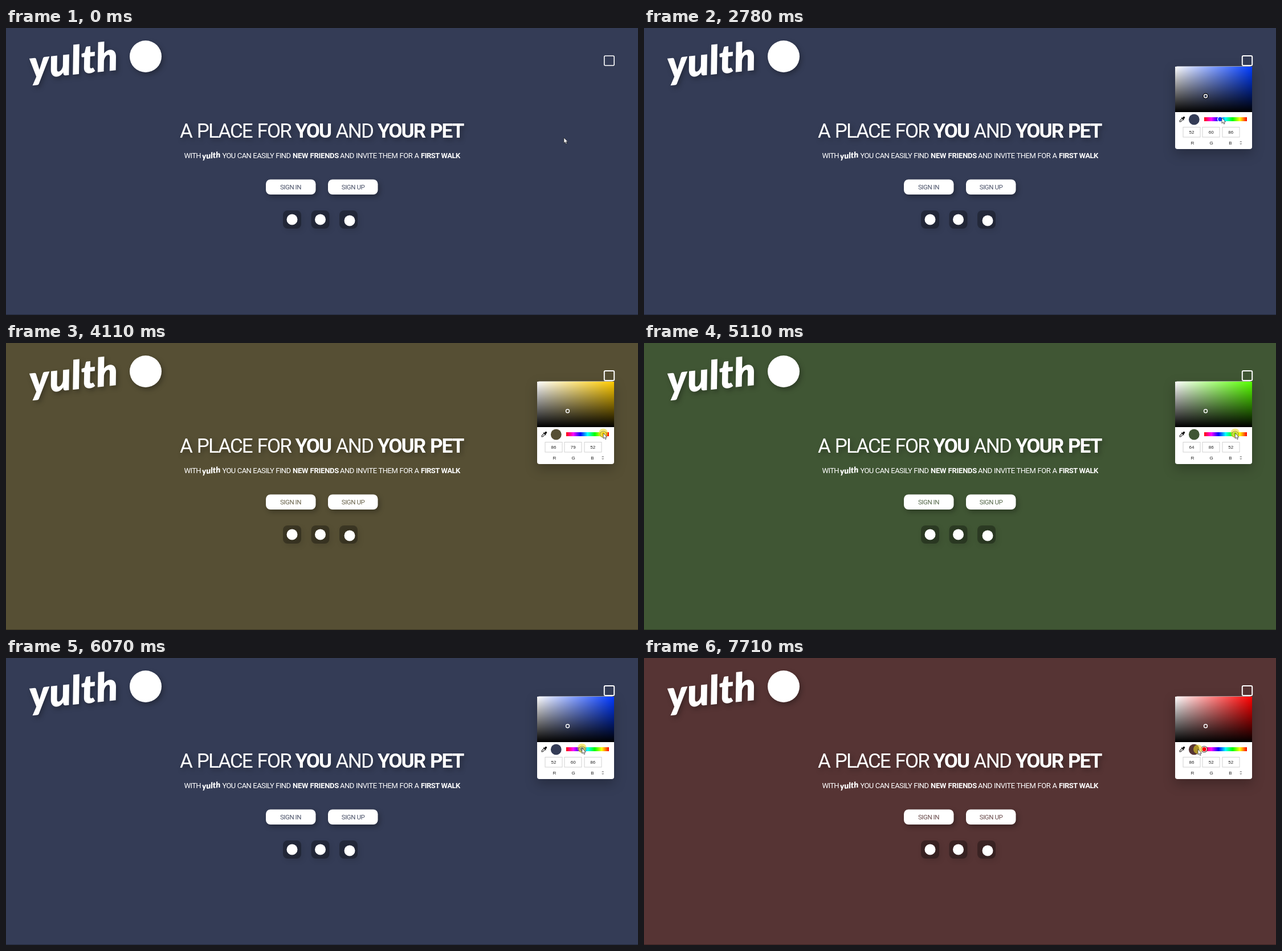
An HTML page that plays this animation: 1109 by 505 pixels, repeating every 8 s.

```html
<!DOCTYPE html>
<html lang="en">
<head>
<meta charset="utf-8">
<title>A place for you and your pet</title>
<style>
  :root { --bg: rgb(52,60,86); --hue: hsl(226,100%,50%); }
  html, body { margin: 0; width: 100%; height: 100%; overflow: hidden; background: var(--bg); }
  svg { display: block; width: 1109px; height: 505px; }
  text { font-family: Roboto, sans-serif; fill: #fff; }
  .name { font: italic 900 70px Lato, sans-serif; }
  .mini { font-size: 14.5px; }
  .soft { filter: drop-shadow(3px 4px 4px rgba(0,0,0,.3)); }
  .head { font-size: 35px; letter-spacing: -1.9px; word-spacing: 2px; }
  .line { font-size: 13px; letter-spacing: -.6px; word-spacing: .5px; }
  .bold { font-weight: 600; }
  .btn { font-size: 11.5px; letter-spacing: -.45px; fill: var(--bg); text-anchor: middle; opacity: .9; }
  .small { font: 8px "Liberation Sans", Arial, sans-serif; fill: #222; text-anchor: middle; }
  .tile { fill: #000; fill-opacity: .3; }
  .panel { filter: drop-shadow(0 8px 10px rgba(0,0,0,.25)); }
  .bgfill { fill: var(--bg); }
  .huefill { fill: var(--hue); }
  .huestop { stop-color: var(--hue); }
  .field { fill: #fff; stroke: #d2d2d2; }
</style>
</head>
<body>
<svg viewBox="0 0 1109 505">
  <defs>
    <linearGradient id="sat"><stop stop-color="#fff"/><stop offset="1" class="huestop"/></linearGradient>
    <linearGradient id="val" x2="0" y2="1"><stop stop-color="#000" stop-opacity="0"/><stop offset="1"/></linearGradient>
    <linearGradient id="spectrum">
      <stop stop-color="#f00"/><stop offset=".1667" stop-color="#f0f"/><stop offset=".3333" stop-color="#00f"/>
      <stop offset=".5" stop-color="#0ff"/><stop offset=".6667" stop-color="#0f0"/>
      <stop offset=".8333" stop-color="#ff0"/><stop offset="1" stop-color="#f00"/>
    </linearGradient>
  </defs>

  <rect class="bgfill" width="1109" height="505"/>
  <rect y="504" width="1109" height="1" fill-opacity=".3"/>

  <g class="soft">
    <text class="name" transform="translate(43 90) rotate(-6)">yulth</text>
    <circle cx="245" cy="50" r="28" fill="#fff"/>
  </g>

  <g class="soft">
    <text class="head" x="305" y="192.5">A PLACE FOR</text>
    <text class="head bold" x="507.5" y="192.5">YOU</text>
    <text class="head" x="578.5" y="192.5" style="letter-spacing:-1.6px">AND</text>
    <text class="head bold" x="652" y="192.5">YOUR PET</text>
  </g>

  <g>
    <text class="line" x="312.5" y="229">WITH</text>
    <text class="name mini" transform="translate(344.5 231) rotate(-6)">yulth</text>
    <text class="line" x="379.5" y="229">YOU CAN EASILY FIND</text>
    <text class="line bold" x="503" y="229" style="letter-spacing:-.25px">NEW FRIENDS</text>
    <text class="line" x="586" y="229" style="letter-spacing:-.5px">AND INVITE THEM FOR A</text>
    <text class="line bold" x="728" y="229" style="letter-spacing:-.5px">FIRST WALK</text>
  </g>

  <g class="soft" fill="#fff">
    <rect x="456" y="266.5" width="87.5" height="26.5" rx="8"/>
    <rect x="565" y="266.5" width="87.5" height="26.5" rx="8"/>
  </g>
  <text class="btn" x="499.5" y="284.3">SIGN IN</text>
  <text class="btn" x="609" y="284.3">SIGN UP</text>

  <g class="soft">
    <rect class="tile" x="486" y="321" width="32" height="32" rx="8"/>
    <rect class="tile" x="535.5" y="321" width="32" height="32" rx="8"/>
    <rect class="tile" x="585" y="321" width="32" height="32" rx="8"/>
  </g>
  <g fill="#fff">
    <circle cx="502" cy="337" r="9.5"/>
    <circle cx="551.5" cy="337" r="9.5"/>
    <circle cx="603" cy="339" r="9.5"/>
  </g>

  <rect id="well" class="bgfill" x="1049.8" y="49" width="17.4" height="17" rx="2" stroke="#fff"/>

  <g id="picker">
    <rect class="panel" x="932" y="67.5" width="135" height="145.5" rx="4" fill="#fff"/>
    <rect x="932" y="68" width="135" height="80" fill="url(#sat)"/>
    <rect x="932" y="68" width="135" height="80" fill="url(#val)"/>
    <circle id="spotRing" cx="985.5" cy="119.7" r="4.2" fill="none" stroke="#000" stroke-width="1.4"/>
    <circle class="bgfill" cx="985.5" cy="119.7" r="3" stroke="#fff" stroke-width="1.4"/>

    <g transform="translate(944.3 160.7) rotate(45)" fill="#111">
      <rect x="-1.7" y="-6.2" width="3.4" height="5" rx="1.6"/>
      <rect x="-3" y="-2" width="6" height="1.5"/>
      <path d="M-1.3-.5V4.5L0 6 1.3 4.5V-.5" fill="#fff" stroke="#111"/>
    </g>
    <circle class="bgfill" cx="965.3" cy="161" r="9.4"/>
    <rect x="983" y="157" width="75" height="7" fill="url(#spectrum)"/>
    <g id="thumb">
      <circle id="thumbRing" r="5.7" fill="#000"/>
      <circle class="huefill" r="4.3" stroke="#fff" stroke-width="1.3"/>
    </g>

    <rect class="field" x="946" y="174.5" width="30" height="17.5"/>
    <rect class="field" x="980" y="174.5" width="30" height="17.5"/>
    <rect class="field" x="1015" y="174.5" width="30" height="17.5"/>
    <text class="small num" x="961" y="186">52</text>
    <text class="small num" x="995.3" y="186">60</text>
    <text class="small num" x="1029.8" y="186">86</text>
    <text class="small" x="962.3" y="205">R</text>
    <text class="small" x="995.6" y="205">G</text>
    <text class="small" x="1029" y="205">B</text>
    <path d="M1045.8 201L1047.3 199.5 1048.8 201M1045.8 203L1047.3 204.5 1048.8 203" fill="none" stroke="#333" stroke-width=".9"/>
  </g>

  <g id="pointer">
    <circle id="press" r="8" fill="#f0dc1e" fill-opacity=".57"/>
    <path d="M0 0V9.6L2.1 7.6 3.6 11 5.2 10.3 3.8 7.1H6.7Z" fill="#fff" stroke="#1c1c1c" stroke-width=".7"/>
  </g>
</svg>

<script>
  const LOOP = 8000, TICK = 68.3, PHASE = 520;
  const PRESS = 2900, OPEN = 1815;
  const BAR_X = 983, BAR_W = 75, START_HUE = 225.9;

  // time, x, y of the pointer
  const path = [
    [0, 979, 193], [452, 979, 193], [700, 948, 176], [880, 926, 148],
    [1270, 1030, 66], [1339, 1042, 63], [1612, 1060, 54.5], [2025, 1060, 54.5],
    [2773, 1014, 158], [2842, 1010.9, 158.5], [2910, 1010.9, 158.5],
    [3690, 1040, 158.5], [4071, 1048.08, 158.5], [4700, 1048.08, 158.5],
    [5574, 1024.18, 158.5], [6400, 1001, 158.5], [6530, 997.7, 158.5],
    [6600, 997.7, 158.5], [7140, 983, 159], [7691, 972, 160.5], [8000, 972, 160.5]
  ];

  const $ = id => document.getElementById(id);
  const root = document.documentElement.style;
  const nums = document.querySelectorAll('.num');
  const show = (id, on) => $(id).setAttribute('visibility', on ? 'visible' : 'hidden');
  const move = (id, x, y) => $(id).setAttribute('transform', `translate(${x} ${y})`);
  const clamp = (v, lo, hi) => Math.min(hi, Math.max(lo, v));

  function pointAt(t) {
    const i = Math.max(1, path.findIndex(k => k[0] >= t));
    const [t0, x0, y0] = path[i - 1], [t1, x1, y1] = path[i];
    const p = clamp((t - t0) / (t1 - t0), 0, 1);
    return [x0 + (x1 - x0) * p, y0 + (y1 - y0) * p];
  }

  // The shade keeps its saturation and value; only the hue turns.
  function shade(hue) {
    return [0, 240, 120].map(turn => {
      const d = Math.abs((hue + turn + 180) % 360 - 180);
      return Math.round(52 + 34 * clamp((120 - d) / 60, 0, 1));
    });
  }

  function draw(time) {
    const t = Math.max(0, PHASE + TICK * Math.floor((time - PHASE) / TICK));
    const [x, y] = pointAt(t);
    const pressed = t >= PRESS;
    const hue = pressed ? 360 * (1 - clamp((x - BAR_X) / BAR_W, 0, 1)) : START_HUE;
    const rgb = shade(hue);

    root.setProperty('--bg', `rgb(${rgb})`);
    root.setProperty('--hue', `hsl(${hue},100%,50%)`);
    nums.forEach((n, i) => n.textContent = rgb[i]);

    const step = Math.floor((t - OPEN) / TICK + .01) + 1;
    $('picker').setAttribute('opacity', clamp(step * .4, 0, 1));
    show('picker', step > 0);
    $('well').setAttribute('stroke-width', step > 0 ? 2 : 1.6);
    $('spotRing').style.opacity = pressed ? 0 : 1;
    $('thumbRing').style.opacity = pressed ? 1 : 0;
    show('press', pressed);
    move('thumb', BAR_X + BAR_W * (1 - hue / 360), 160.5);
    move('pointer', x, y);
  }

  const start = performance.now();
  function frame() {
    draw((performance.now() - start) % LOOP);
    requestAnimationFrame(frame);
  }
  frame();
</script>
</body>
</html>
```
